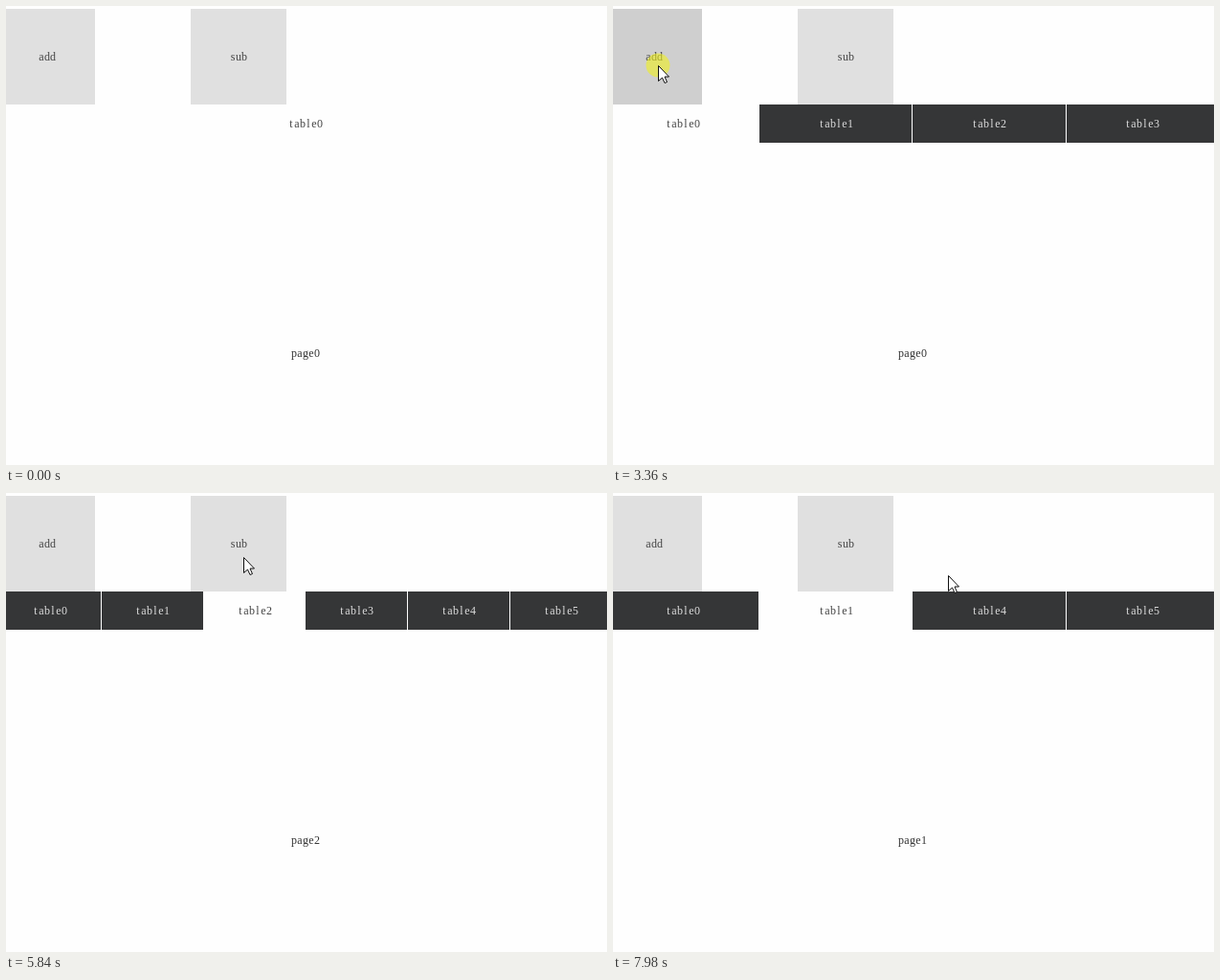
Recreate the animation shown at these times as an HTML page with a canvas. Size 628 by 480 pixels, loop 8 s.

```html
<!DOCTYPE html>
<html>
<head>
<meta charset="utf-8">
<style>
  html, body { margin: 0; width: 628px; height: 480px; overflow: hidden; background: #fefefe; }
  canvas { display: block; }
</style>
</head>
<body>
<canvas id="stage" width="628" height="480"></canvas>
<script>
const ctx = document.getElementById('stage').getContext('2d');
const LOOP = 8000, LEFT = -7, WIDTH = 640, STEP = 70;

// [start, tab ids, selected id]
const states = [
  [0, '0', 0], [1360, '01', 0], [2100, '012', 0], [2700, '0123', 0],
  [3430, '01234', 0], [4220, '012345', 0], [5570, '012345', 2],
  [6300, '01345', 1], [6970, '01345', 3], [7580, '0145', 1]
];

// [mouse down, mouse up]
const presses = [
  [1230, 1360], [1960, 2100], [2630, 2700], [3360, 3430], [4090, 4220],
  [5500, 5570], [6170, 6300], [6900, 6970], [7510, 7580]
];

// [start, number of steps, x, y]
const moves = [
  [0, 1, 581, 500], [130, 1, 581, 466], [200, 9, 20, 112], [890, 1, 25, 91],
  [960, 1, 34, 78], [1030, 1, 47, 62], [4950, 1, 64, 70], [5020, 5, 266, 126],
  [5770, 1, 258, 96], [5840, 1, 248, 67], [6500, 5, 292, 130],
  [7030, 4, 254, 51], [7310, 1, 252, 51], [7920, 1, 300, 68], [7980, 1, 350, 86]
];

const arrow = new Path2D('M.5 .5V16.5L4.5 13L7 18.5L9.5 17.5L7 12H11.5Z');

function box(x, y, right, bottom, color) {
  ctx.fillStyle = color;
  ctx.fillRect(x, y, right - x, bottom - y);
}

// Every character sits in a 6px cell
function label(text, center, y, color) {
  const x = Math.round(center - text.length * 3) + 3;
  ctx.fillStyle = color;
  [...text].forEach((ch, i) => ctx.fillText(ch, x + i * 6, y + 4));
}

function cursorAt(t) {
  const i = moves.findLastIndex(m => m[0] <= t);
  const [start, steps, x, y] = moves[i];
  const [, , fromX, fromY] = moves[Math.max(0, i - 1)];
  const p = Math.min(1, (Math.floor((t - start) / STEP) + 1) / steps);
  const e = p * p * (3 - 2 * p);
  return [Math.round(fromX + (x - fromX) * e), Math.round(fromY + (y - fromY) * e)];
}

function button(text, x, pressed) {
  box(x, 3, x + 100, 103, pressed ? '#cfcfcf' : '#e0e0e0');
  label(text, x + 50, 53, '#444');
}

function drawTabs(ids, selected) {
  const n = ids.length, w = (WIDTH - n + 1) / n;
  const gap = i => Math.round(LEFT + i * (w + 1) - 1.01);
  [...ids].forEach((id, i) => {
    const active = +id === selected;
    if (!active) box(gap(i) + 1, 103, gap(i + 1), 143, '#353637');
    label('table' + id, LEFT + i * (w + 1) + w / 2, 123, active ? '#444' : '#ddd');
  });
}

function draw(t) {
  const [, ids, selected] = states.findLast(s => s[0] <= t);
  const down = presses.some(([a, b]) => t >= a && t < b);
  const [x, y] = cursorAt(t);
  const onButton = down && y < 103;

  box(0, 0, 628, 480, '#fefefe');
  ctx.font = '12px "Liberation Serif", serif';
  ctx.textAlign = 'center';
  button('add', LEFT, onButton && x < 93);
  button('sub', 193, onButton && x >= 193);
  drawTabs(ids, selected);
  label('page' + selected, 313, 363, '#333');

  if (down) {
    ctx.fillStyle = 'rgba(240,240,30,.6)';
    ctx.beginPath();
    ctx.arc(x, y, 12.5, 0, 7);
    ctx.fill();
  }
  ctx.save();
  ctx.translate(x, y);
  ctx.fillStyle = '#fff';
  ctx.strokeStyle = '#111';
  ctx.fill(arrow);
  ctx.stroke(arrow);
  ctx.restore();
}

function tick() {
  draw(performance.now() % LOOP);
  requestAnimationFrame(tick);
}
tick();
</script>
</body>
</html>
```
